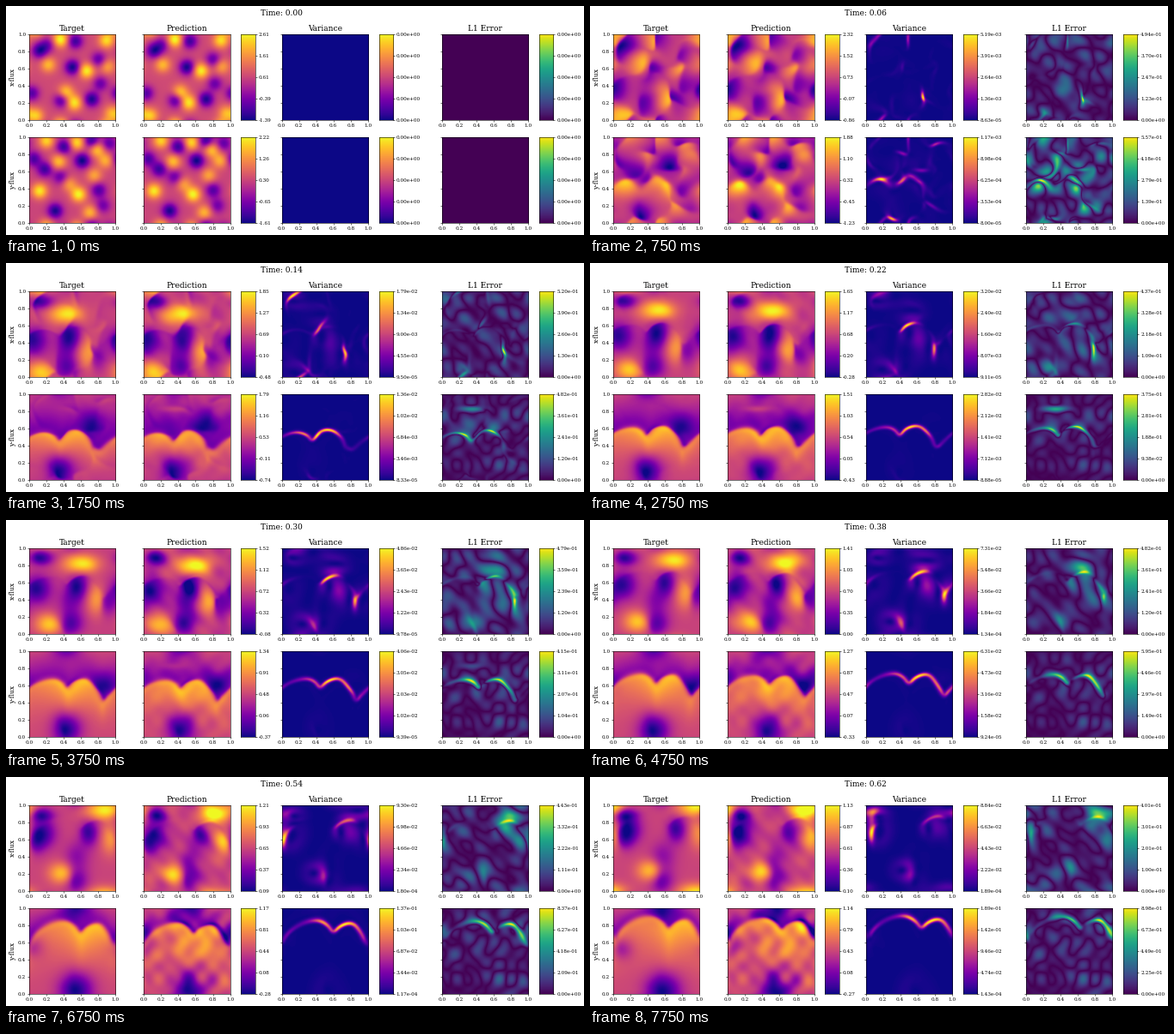
Recreate the animation shown at these times as a matplotlib script. Size 672 by 267 pixels, loop 8000 ms.

```python
import numpy as np
import matplotlib.pyplot as plt
from matplotlib.animation import FuncAnimation

W, H, DPI = 672, 267, 100
FRAMES, STEP = 32, 0.02
N, DT, NU = 128, 0.001, 0.003
PT = 72 / DPI  # points per pixel

plt.rcParams["font.family"] = "DejaVu Serif"
plt.rcParams["axes.unicode_minus"] = False
plt.rcParams["axes.linewidth"] = 0.4

# Colour limits (low, high) for each row at a few key times
TIMES = [0, 0.06, 0.14, 0.22, 0.30, 0.46, 0.62]
FLUX = [([-1.39, -0.86, -0.48, -0.28, -0.08, 0.08, 0.10],
         [2.61, 2.32, 1.85, 1.65, 1.52, 1.29, 1.13]),
        ([-1.61, -1.23, -0.74, -0.43, -0.37, -0.30, -0.27],
         [2.22, 1.88, 1.79, 1.51, 1.34, 1.21, 1.14])]
VAR = [([0, 8.63e-5, 9.50e-5, 9.11e-5, 9.78e-5, 1.70e-4, 1.89e-4],
        [0, 5.19e-3, 1.79e-2, 3.20e-2, 4.86e-2, 9.75e-2, 8.84e-2]),
       ([0, 8.00e-5, 8.33e-5, 8.88e-5, 9.39e-5, 9.10e-5, 1.43e-4],
        [0, 1.17e-3, 1.36e-2, 2.82e-2, 4.06e-2, 8.56e-2, 1.89e-1])]
ERR = [([0] * 7, [0, 0.494, 0.520, 0.437, 0.479, 0.485, 0.401]),
       ([0] * 7, [0, 0.557, 0.482, 0.375, 0.415, 0.775, 0.898])]

# Starting peaks and hollows, strongest first
U_PEAKS = [(.36, .93), (.66, .57), (.52, .20), (.89, .92), (.42, .32),
           (.08, .05), (.22, .64), (.95, .08), (.90, .62)]
U_HOLLOWS = [(.50, .61), (.72, .24), (.12, .80), (.53, .91), (.37, .23),
             (.03, .31), (.80, .70), (.82, .42), (.21, .87)]
V_PEAKS = [(.57, .33), (.12, .37), (.55, .93), (.20, .95), (.78, .85),
           (.34, .71), (.70, .12), (.88, .72), (.75, .55), (.46, .45)]
V_HOLLOWS = [(.61, .72), (.30, .14), (.72, .95), (.40, .88), (.18, .62),
             (.05, .74), (.80, .38), (.92, .92), (.36, .53), (.85, .20)]

axis = (np.arange(N) + 0.5) / N
X, Y = np.meshgrid(axis, axis)
freq = np.fft.fftfreq(N, 1 / N)
K2 = freq[None, :] ** 2 + freq[:, None] ** 2


def limits(table, t):
    return [float(np.interp(t, TIMES, row)) for row in table]


def wrap(d):
    return (d + 0.5) % 1 - 0.5


def bump(x, y, rx, ry=None):
    return np.exp(-(wrap(X - x) / rx) ** 2 / 2
                  - (wrap(Y - y) / (ry or rx)) ** 2 / 2)


def fit(f, lo, hi):
    return lo + (f - f.min()) * (hi - lo) / (np.ptp(f) + 1e-12)


def blur(f, sigma):
    kernel = np.exp(-2 * (np.pi * sigma) ** 2 * K2)
    return np.fft.ifft2(np.fft.fft2(f) * kernel).real


def start(peaks, hollows, table):
    total = np.zeros((N, N))
    for points, sign in ((peaks, 1), (hollows, -1)):
        for (x, y), size in zip(points, np.linspace(1, 0.55, len(points))):
            total += sign * size * bump(x, y, 0.062)
    return fit(total, *limits(table, 0))


def u_level(t):
    """Horizontal flux as drifting warm and cool patches."""
    warm = (0.50 * bump(0.27 + 1.10 * t, 0.67 + 0.50 * t, 0.14, 0.07)
            + 0.42 * bump(0.02 + 0.65 * t, 0.38 * t, 0.10, 0.08)
            + 0.35 * bump(0.56 + 0.73 * t, 0.15 + 0.85 * t, 0.08, 0.12))
    cool = (0.45 * bump(0.13, 0.87, 0.09, 0.05)
            + 0.42 * bump(0.02 + 0.24 * t, 0.34 + 0.60 * t, 0.10, 0.11)
            + 0.42 * bump(0.42 + 0.50 * t, 0.40 + 0.50 * t, 0.07, 0.10)
            + 0.30 * bump(0.68 + 0.73 * t, 0.12 + 0.85 * t, 0.07, 0.10)
            + 0.32 * bump(0.42 + 0.20 * t, 0.12, 0.09)
            + 0.20 * bump(0.38 + 0.30 * t, 0.38, 0.10, 0.12))
    return np.clip(0.48 + warm - cool, 0, 1)


def arc(center, apex, left, right):
    d = wrap(X - center)
    return apex - np.where(d < 0, left, right) * d ** 2


def v_level(t):
    """Vertical flux as two rising domes over a cool pool."""
    front = np.maximum(arc(0.12 + 0.50 * t, 0.46 + 0.76 * t, 1.5, 4),
                       arc(0.48 + 0.55 * t, 0.50 + 0.60 * t, 4, 8))
    front = np.clip(front, 0.35, 0.97)
    glow = 0.35 + 0.65 * np.exp(-(wrap(X - 0.4 - 0.5 * t) / 0.38) ** 2)
    below = 0.50 + 0.45 * glow * np.clip(Y / front, 0, 1) ** 2
    above = 0.22 + 0.28 * np.clip((Y - front) / (1 - front), 0, 1)
    inside = 1 / (1 + np.exp(-np.clip((front - Y) / 0.012, -50, 50)))
    pool = 0.50 * bump(0.29 + 0.45 * t, 0.15 - 0.18 * t, 0.10 + 0.06 * t)
    hole = 0.28 * bump(0.63 + 0.75 * t, 0.70 - 0.30 * t, 0.09)
    return np.clip(above + (below - above) * inside - pool - hole, 0, 1)


def goal(level, table, t):
    lo, hi = limits(table, t)
    return lo + (hi - lo) * level(t)


def rate(f, u, v):
    """Upwind advection plus diffusion."""
    left, right = f - np.roll(f, 1, 1), np.roll(f, -1, 1) - f
    down, up = f - np.roll(f, 1, 0), np.roll(f, -1, 0) - f
    flow = u * np.where(u > 0, left, right) + v * np.where(v > 0, down, up)
    return -N * flow + NU * N * N * (right - left + up - down)


def simulate():
    """Burgers flow, drawn gently towards the drifting large shapes."""
    u = start(U_PEAKS, U_HOLLOWS, FLUX[0])
    v = start(V_PEAKS, V_HOLLOWS, FLUX[1])
    shots = [(u, v)]
    per_frame = round(STEP / DT)
    for s in range(1, (FRAMES - 1) * per_frame + 1):
        u, v = u + DT * rate(u, u, v), v + DT * rate(v, u, v)
        if s % 5 == 0:
            t = s * DT
            pull = 5 * DT * 32 * min(t / 0.12, 1)
            u = u + pull * blur(goal(u_level, FLUX[0], t) - u, 0.03)
            v = v + pull * blur(goal(v_level, FLUX[1], t) - v, 0.03)
        if s % per_frame == 0:
            shots.append((u, v))
    return shots


def ripple(rng):
    total = np.zeros((N, N))
    for _ in range(14):
        kx, ky = rng.integers(-4, 5, 2)
        total += np.cos(2 * np.pi * (kx * X + ky * Y) + rng.uniform(0, 6.28))
    total -= total.mean()
    return total / np.abs(total).max()


def hot_fronts(t):
    """Travelling places where the fronts are strongest."""
    a = bump(0.12 + 0.55 * t, 0.02 + 0.40 * t, 0.15)
    b = bump(0.37 + 0.70 * t, 0.30 + 0.93 * t, 0.15)
    c = bump(0.66 + 0.57 * t, 0.07 + 1.15 * t, 0.15)
    d = bump(0.22 + 0.36 * t, 0.43 + 0.83 * t, 0.15)
    e = bump(0.42 + 0.75 * t, 0.50 + 0.60 * t, 0.15)
    return 0.35 + a + b + c, 0.35 + d + e + 0.5 * (a + c)


def slope2(f):
    gx = np.roll(f, -1, 1) - np.roll(f, 1, 1)
    gy = np.roll(f, -1, 0) - np.roll(f, 1, 0)
    return gx ** 2 + gy ** 2


def build():
    rng = np.random.default_rng(4)
    noise = [ripple(rng), ripple(rng)]
    shots = simulate()
    out = []
    for n, shot in enumerate(shots):
        t = n * STEP
        heat = hot_fronts(t)
        rows = []
        for r in range(2):
            target = shot[r]
            variance = np.zeros((N, N))
            diff = np.zeros((N, N))
            if n:
                variance = blur(slope2(target), 0.01) * heat[r]
                variance = fit(variance, *limits(VAR[r], t))
                diff = (shots[n - 1][r] - target) * heat[r]
                diff = diff / np.abs(diff).max() + 0.3 * noise[r]
                if r:
                    streak = bump(0.34, 0.82, 0.10, 0.025)
                    diff += 0.8 * streak * np.exp(-((t - 0.2) / 0.09) ** 2)
                diff *= limits(ERR[r], t)[1] / np.abs(diff).max()
            rows.append((target, target + diff, variance, np.abs(diff)))
        out.append(rows)
    return out


fig = plt.figure(figsize=(W / DPI, H / DPI), dpi=DPI, facecolor="white")


def add_axes(x, y, w, h):
    ax = fig.add_axes([x / W, 1 - (y + h) / H, w / W, h / H])
    ax.tick_params(labelsize=5.8 * PT, length=2 * PT, width=0.4, pad=2 * PT)
    return ax


COLS = [("Target", 27, "plasma"), ("Prediction", 160.3, "plasma"),
        ("Variance", 320.5, "plasma"), ("L1 Error", 507, "viridis")]
BARS = [(273.3, "plasma"), (433.5, "plasma"), (620, "viridis")]
TICKS = np.linspace(0, 1, 6)
ramp = np.linspace(0, 1, 256)[:, None]

images, bars = [], []
for row, (top, name) in enumerate([(32.7, "x-flux"), (153, "y-flux")]):
    line = []
    for col, (title, left, cmap) in enumerate(COLS):
        ax = add_axes(left, top, 100.3, 100.3)
        line.append(ax.imshow(np.zeros((N, N)), cmap=cmap, origin="lower",
                              extent=(0, 1, 0, 1), aspect="auto"))
        ax.set_xticks(TICKS)
        ax.set_yticks(TICKS)
        if col:
            ax.tick_params(labelleft=False)
        else:
            fig.text(8 / W, 1 - (top + 50) / H, name, rotation=90,
                     ha="center", va="center", fontsize=7.6 * PT)
        if row == 0:
            ax.set_title(title, fontsize=9 * PT, pad=3.4 * PT)
    images.append(line)
    side = []
    for left, cmap in BARS:
        ax = add_axes(left, top, 16.3, 100.3)
        ax.imshow(ramp, cmap=cmap, origin="lower", extent=(0, 1, 0, 1),
                  aspect="auto")
        ax.set_xticks([])
        ax.yaxis.tick_right()
        ax.set_yticks(np.linspace(0, 1, 5))
        side.append(ax)
    bars.append(side)

clock = fig.text(320 / W, 1 - 8.5 / H, "", ha="center", va="center",
                 fontsize=9 * PT)
states = build()


def draw(n):
    t = n * STEP
    clock.set_text(f"Time: {t:.2f}")
    for r in range(2):
        spans = [limits(table[r], t) for table in (FLUX, VAR, ERR)]
        for image, data, k in zip(images[r], states[n][r], (0, 0, 1, 2)):
            lo, hi = spans[k]
            image.set_data(data)
            image.set_clim(lo, hi if hi > lo else lo + 1)
        for ax, (lo, hi), form in zip(bars[r], spans, (".2f", ".2e", ".2e")):
            ax.set_yticklabels([format(x, form)
                                for x in np.linspace(lo, hi, 5)])
    return []


anim = FuncAnimation(fig, draw, frames=FRAMES, interval=250, repeat=True,
                     blit=False)
plt.show()
```
